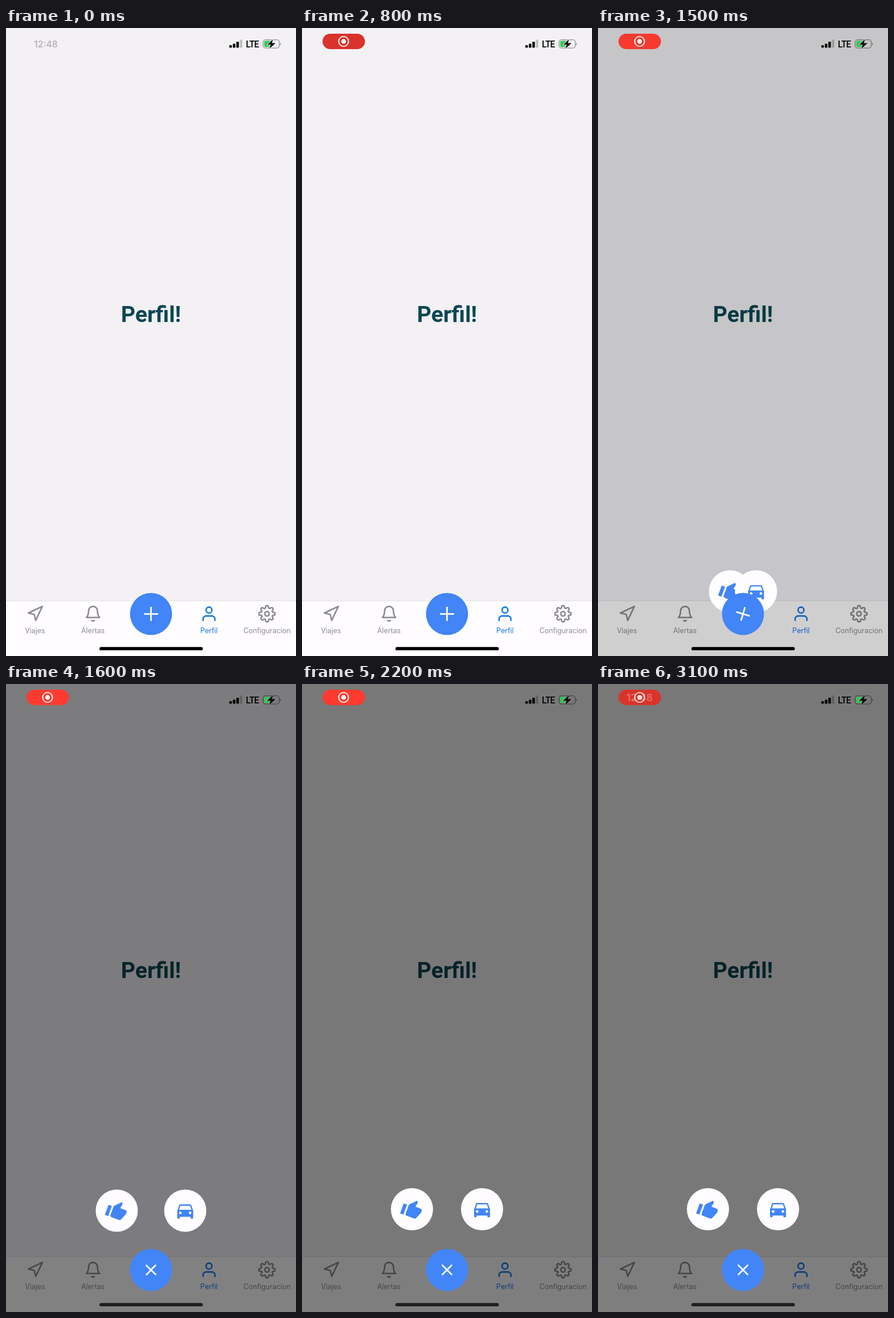
Write an HTML page that moves like this. It is 509 px wide and 1100 px high and loops after 3.2 s.

```html
<!DOCTYPE html>
<html lang="es">
<head>
<meta charset="utf-8">
<title>Perfil</title>
<style>
  html, body { margin: 0; width: 100%; height: 100%; overflow: hidden; background: #f3f1f4; }
  svg { display: block; width: 100%; height: 100%; }
  text { text-anchor: middle; font-family: Inter, sans-serif; }
  .tab { color: #8b898e; font-size: 12.4px; }
  .tab.active { color: #1478e6; }
  .tab text { fill: currentColor; }
  .line { fill: none; stroke: currentColor; stroke-width: 2; stroke-linecap: round; stroke-linejoin: round; }
  .title { font: 700 39.15px Roboto, sans-serif; fill: #0b4753; }
  .clock { font-weight: 600; }
  .blue { fill: #4285f8; }
  .white { fill: #fffdff; }
</style>
</head>
<body>
<svg viewBox="0 0 509 1100">
  <rect width="509" height="1100" fill="#f3f1f4"/>
  <text class="title" x="254.5" y="515">Perfil!</text>

  <rect class="white" y="1003.5" width="509" height="96.5"/>
  <path d="M0 1003.5H509" stroke="#e2e0e4"/>
  <g id="tabs"></g>

  <rect id="dim" width="509" height="1100"/>
  <rect id="home" x="164" y="1084.3" width="181.5" height="5.8" rx="2.9"/>

  <g id="ride">
    <circle class="white" r="37"/>
    <path class="blue" transform="rotate(20) scale(1.555) translate(-12 -12)" d="M1 21h4V9H1v12zm22-11c0-1.1-.9-2-2-2h-6.31l.95-4.57.03-.32c0-.41-.17-.79-.44-1.06L14.17 1 7.59 7.59C7.22 7.95 7 8.45 7 9v10c0 1.1.9 2 2 2h9c.83 0 1.54-.5 1.84-1.22l3.02-7.05c.09-.23.14-.47.14-.73v-2z"/>
  </g>
  <g id="car">
    <circle class="white" r="37"/>
    <path class="blue" transform="scale(1.555) translate(-12 -12)" d="M18.92 6.01C18.72 5.42 18.16 5 17.5 5h-11c-.66 0-1.21.42-1.42 1.01L3 12v8c0 .55.45 1 1 1h1c.55 0 1-.45 1-1v-1h12v1c0 .55.45 1 1 1h1c.55 0 1-.45 1-1v-8l-2.08-5.99zM6.5 16a1.5 1.5 0 1 1 0-3 1.5 1.5 0 0 1 0 3zm11 0a1.5 1.5 0 1 1 0-3 1.5 1.5 0 0 1 0 3zM5 11l1.5-4.5h11L19 11H5z"/>
  </g>
  <g transform="translate(254.5 1026.3)">
    <circle class="blue" r="36.9"/>
    <path id="plus" d="M-11.3 0H11.3M0-11.3V11.3" stroke="#fffdff" stroke-width="2.8" stroke-linecap="round"/>
  </g>

  <!-- Status bar -->
  <text id="clock" class="clock" x="70" y="34" font-size="15.5" fill="#1c0d10">12:48</text>
  <g id="pill">
    <rect id="pillShape" x="36" y="10" width="74.5" height="27" rx="13.5"/>
    <text id="pillClock" class="clock" x="73" y="30" font-size="17.3" fill="#fff">12:48</text>
    <g id="record">
      <circle cx="73" cy="23.5" r="8.6" fill="none" stroke="#fff" stroke-width="1.9"/>
      <circle cx="73" cy="23.5" r="4" fill="#fff"/>
    </g>
  </g>
  <rect x="392" y="30" width="4.4" height="4.5" rx="1"/>
  <rect x="398.2" y="27.5" width="4.4" height="7" rx="1"/>
  <rect x="404.3" y="24" width="4.4" height="10.5" rx="1"/>
  <rect x="410.4" y="20.5" width="4.4" height="14" rx="1" opacity=".2"/>
  <text x="432.2" y="34" style="font:500 15.6px Roboto,sans-serif;letter-spacing:-1px">LTE</text>
  <rect x="451.3" y="20.6" width="28.4" height="14.6" rx="4.4" fill="none" stroke="#000" stroke-opacity=".42" stroke-width="1.3"/>
  <path d="M481.2 25.6q3 2.3 0 4.6z" opacity=".45"/>
  <rect x="453.2" y="22.5" width="13" height="10.8" rx="2.5" fill="#34c759"/>
  <path id="bolt" d="M468.5 19.8 458.8 29.3H464.6L462.4 36.3 472.8 26.6H466.6Z" stroke-width="2" paint-order="stroke" stroke-linejoin="round"/>
</svg>
<script>
const $ = id => document.getElementById(id);
const clamp = v => Math.min(1, Math.max(0, v));

const tabs = [
  ['Viajes', '<path d="M3 11 22 2 13 21 11 13z"/>'],
  ['Alertas', '<path d="M18 8A6 6 0 0 0 6 8c0 7-3 9-3 9h18s-3-2-3-9M13.73 21a2 2 0 0 1-3.46 0"/>'],
  null,
  ['Perfil', '<path d="M20 21v-2a4 4 0 0 0-4-4H8a4 4 0 0 0-4 4v2"/><circle cx="12" cy="7" r="4"/>'],
  ['Configuracion', '<circle cx="12" cy="12" r="3"/><path d="M19.4 15a1.65 1.65 0 0 0 .33 1.82l.06.06a2 2 0 1 1-2.83 2.83l-.06-.06a1.65 1.65 0 0 0-2.8 1.18V21a2 2 0 0 1-4 0v-.09a1.65 1.65 0 0 0-2.9-1.08l-.06.06a2 2 0 1 1-2.83-2.83l.06-.06A1.65 1.65 0 0 0 3.09 14H3a2 2 0 0 1 0-4h.09a1.65 1.65 0 0 0 1.18-2.8l-.06-.06a2 2 0 1 1 2.83-2.83l.06.06A1.65 1.65 0 0 0 10 3.09V3a2 2 0 0 1 4 0v.09a1.65 1.65 0 0 0 2.8 1.18l.06-.06a2 2 0 1 1 2.83 2.83l-.06.06A1.65 1.65 0 0 0 20.91 10H21a2 2 0 0 1 0 4h-.09a1.65 1.65 0 0 0-1.51 1z"/>'],
];
$('tabs').innerHTML = tabs.map((tab, i) => tab ? `
  <g class="tab ${tab[0] === 'Perfil' ? 'active' : ''}" transform="translate(${50.9 + i * 101.8} 1026)">
    <g class="line" transform="scale(1.29) translate(-12 -12)">${tab[1]}</g>
    <text y="34">${tab[0]}</text>
  </g>` : '').join('');

function draw(t) {
  const open = Math.sin(clamp((t - 1414) / 206) * Math.PI / 2) ** 2;
  const y = 1026.3 - 106.3 * open;
  $('ride').setAttribute('transform', `translate(${254.5 - 61.5 * open} ${y})`);
  $('car').setAttribute('transform', `translate(${254.5 + 61.5 * open} ${y})`);
  $('plus').setAttribute('transform', `rotate(${45 * open})`);
  $('dim').setAttribute('opacity', open / 2);
  const shade = Math.round(243 * (1 - open / 2));
  $('bolt').setAttribute('stroke', `rgb(${shade},${shade},${shade})`);
  const bar = Math.round(31 * clamp(open * 2 - 1));
  $('home').setAttribute('fill', `rgb(${bar},${bar},${bar})`);

  // The recording pill pulses between two reds and trades places with the clock.
  const glow = clamp(0.56 + 0.7 * Math.cos((t - 1950) / 2300 * 2 * Math.PI));
  $('pillShape').setAttribute('fill', `rgb(${218 + 37 * glow},${51 + 8 * glow},${43 + 5 * glow})`);
  $('pill').setAttribute('opacity', clamp(t / 300));
  $('clock').setAttribute('opacity', 0.27 * clamp(1 - t / 200));
  const swap = clamp((t - 3000) / 100);
  $('pillClock').setAttribute('opacity', 0.3 * swap);
  $('record').setAttribute('opacity', 1 - 0.15 * swap);
}

const LOOP = 3200, STEP = 100;
const start = performance.now();
function tick() {
  const t = (performance.now() - start) % LOOP;
  draw(Math.floor(t / STEP) * STEP);
  requestAnimationFrame(tick);
}
tick();
</script>
</body>
</html>
```
